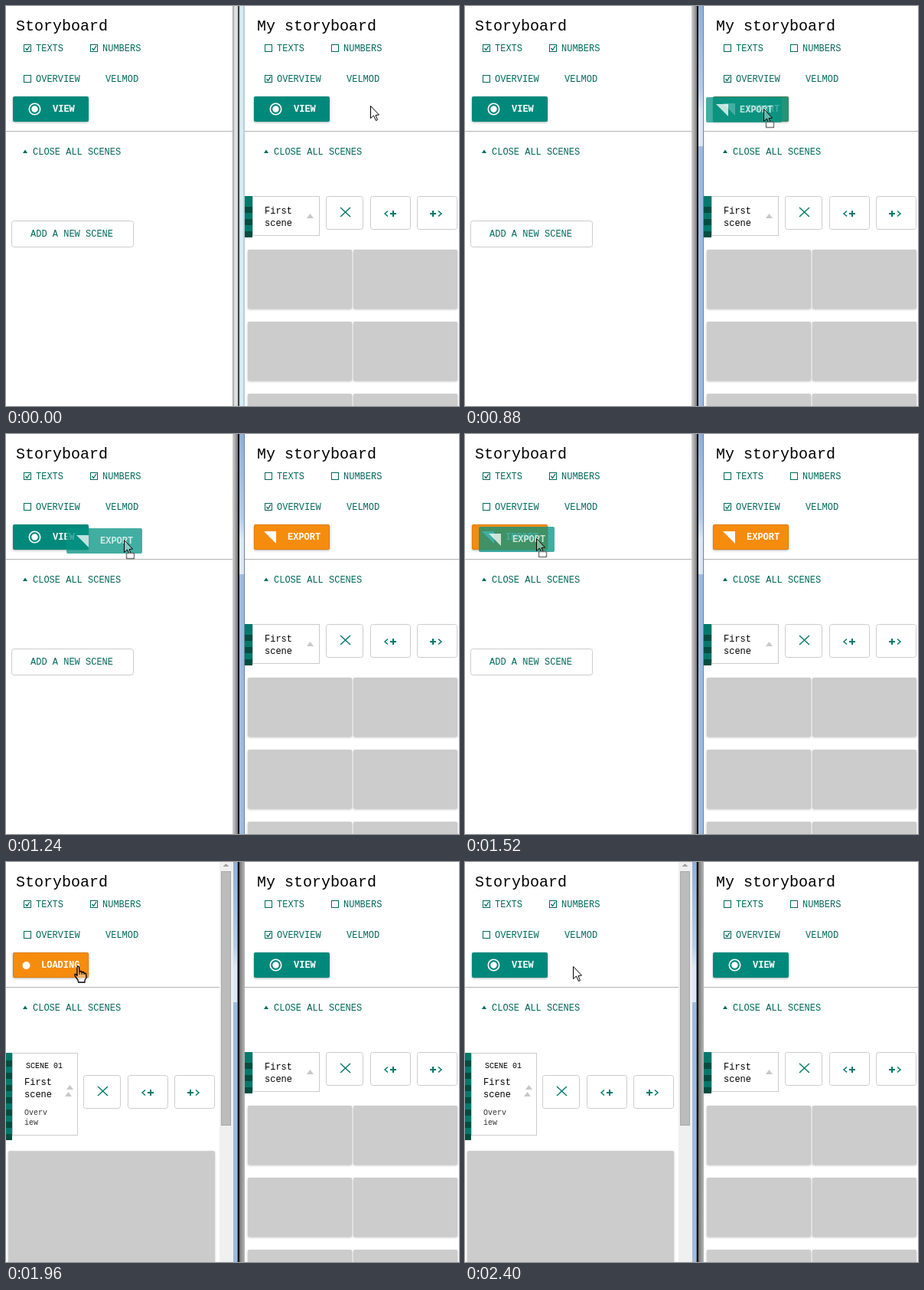
Write an HTML page with a canvas that moves like this. It is 592 px wide and 522 px high and loops after 3.04 s.

```html
<!DOCTYPE html>
<html>
<head>
<meta charset="utf-8">
<title>Storyboard</title>
<style>
html, body { margin: 0; width: 100%; height: 100%; overflow: hidden; background: #fff; }
canvas { display: block; }
</style>
</head>
<body>
<canvas id="stage" width="592" height="522"></canvas>
<script>
const g = document.getElementById('stage').getContext('2d');
const LOOP = 3040, STEP = 40;
const TEAL = [0, 137, 123], HOVER = [12, 148, 132], ORANGE = [246, 140, 13];
const LINK = '#00695c', ICON = '#00796b', GREY = '#ccc';

const ease = {
  lin: u => u,
  in: u => u * u,
  out: u => u * (2 - u),
  both: u => u * u * (3 - 2 * u)
};
const clamp = u => Math.max(0, Math.min(1, u));

// time, x, y, easing towards this point
const pointer = [
  [0, 476, 130, 'lin'], [240, 476, 130, 'lin'], [600, 399, 133, 'both'],
  [800, 399, 133, 'lin'], [1000, 343, 138, 'in'], [1240, 154, 138, 'lin'],
  [1360, 107, 137, 'out'], [1520, 93, 136, 'out'], [1960, 93, 136, 'lin'],
  [2360, 141, 136, 'both'], [LOOP, 141, 136, 'lin']
];
// time, colour, length of the blend
const leftTint = [[0, TEAL, 1], [1380, ORANGE, 120], [2120, TEAL, 280]];
const rightTint = [[0, TEAL, 1], [460, HOVER, 140], [840, ORANGE, 200], [1840, TEAL, 80]];

function pointerAt(t) {
  const i = Math.max(1, pointer.findIndex(k => k[0] >= t));
  const [t0, x0, y0] = pointer[i - 1], [t1, x1, y1, e] = pointer[i];
  const u = ease[e]((t - t0) / (t1 - t0));
  return [Math.round(x0 + (x1 - x0) * u), Math.round(y0 + (y1 - y0) * u)];
}

function tintAt(keys, t) {
  let c = keys[0][1];
  for (const [start, to, len] of keys) {
    const u = ease.both(clamp((t - start) / len));
    c = c.map((v, i) => v + (to[i] - v) * u);
  }
  return `rgb(${c.map(Math.round)})`;
}

function box(x, y, w, h, fill) {
  g.fillStyle = fill;
  g.fillRect(x, y, w, h);
}

function text(s, x, y, color = LINK, size = 12, weight = '') {
  g.font = `${weight} ${size}px "Liberation Mono", monospace`;
  g.fillStyle = color;
  g.fillText(s, x, y);
}

function path(points, fill, stroke, width = 1, closed = true) {
  g.beginPath();
  for (let i = 0; i < points.length; i += 2) g.lineTo(points[i], points[i + 1]);
  if (closed) g.closePath();
  if (fill) { g.fillStyle = fill; g.fill(); }
  if (stroke) { g.strokeStyle = stroke; g.lineWidth = width; g.stroke(); }
}

function rounded(x, y, w, h, r, fill, stroke) {
  g.beginPath();
  g.roundRect(x, y, w, h, r);
  if (fill) { g.fillStyle = fill; g.fill(); }
  if (stroke) { g.strokeStyle = stroke; g.lineWidth = 1; g.stroke(); }
}

function raised(x, y, w, h, fill, shade = .3) {
  g.save();
  g.shadowColor = `rgba(0,0,0,${shade})`;
  g.shadowBlur = 3;
  g.shadowOffsetY = 1;
  rounded(x, y, w, h, 2, fill);
  g.restore();
}

function at(x, y, draw) {
  g.save();
  g.translate(x, y);
  draw();
  g.restore();
}

function disc(x, y, r) {
  g.beginPath();
  g.arc(x, y, r, 0, 7);
  g.fillStyle = '#fff';
  g.fill();
}

function option(label, x, y, checked) {
  g.strokeStyle = LINK;
  g.lineWidth = 1;
  g.strokeRect(x + .5, y + .5, 9, 9);
  if (checked) path([x + 2.5, y + 5, x + 4.5, y + 7.5, x + 8, y + 2], null, LINK, 1.3, false);
  text(label, x + 16, y + 9);
}

function buttonFace(label) {
  if (label === 'VIEW') {
    g.beginPath();
    g.arc(28.5, 16.5, 7.2, 0, 7);
    g.strokeStyle = '#fff';
    g.lineWidth = 1.6;
    g.stroke();
    disc(28.5, 16.5, 4.2);
    text(label, 52, 20, '#fff', 12, 'bold');
  } else if (label === 'LOADING') {
    disc(17.5, 17, 5);
    text(label, 37, 20, '#fff', 12, 'bold');
  } else {
    path([13, 9, 29, 9, 29, 25], '#fff');
    text(label, 44, 20, '#fff', 12, 'bold');
  }
}

function mainButton(label, tint) {
  at(9, 118, () => {
    raised(0, 0, 99, 33, tint);
    if (label !== 'VIEW') rounded(.5, .5, 98, 32, 2, null, 'rgba(160,80,0,.25)');
    buttonFace(label);
  });
}

function header(title, checks, label, tint) {
  text(title, 13, 32, '#000', 20);
  option('TEXTS', 23, 50, checks);
  option('NUMBERS', 110, 50, checks);
  option('OVERVIEW', 23, 90, !checks);
  text('VELMOD', 130, 99);
  path([22, 192, 25, 187.5, 28, 192], LINK);
  text('CLOSE ALL SCENES', 35, 194);
  mainButton(label, tint);
}

function strip(x, y, w, h, first) {
  box(x, y, w, h, ICON);
  for (let d = first; d < h; d += 16) box(x, y + d, w, 8, '#004d40');
}

function card(x, y, w, h) {
  box(x, y, w, h, '#fff');
  g.strokeStyle = GREY;
  g.lineWidth = 1;
  g.strokeRect(x + .5, y + .5, w - 1, h - 1);
}

function sceneName(x, y) {
  text('First', x, y, '#000');
  text('scene', x, y + 16, '#000');
  path([x + 55, y + 6, x + 59.5, y, x + 64, y + 6], '#c8c8c8');
}

function plus(x) {
  box(x - 4, 22, 8, 2, ICON);
  box(x - 1, 19, 2, 8, ICON);
}

function sceneButtons(x, y) {
  at(x, y, () => {
    [[0, 48], [58, 52], [119, 52]].forEach(([bx, w]) =>
      rounded(bx + .5, .5, w, 43, 3, '#fff', GREY));
    path([19, 15, 32, 27], null, ICON, 1.4, false);
    path([32, 15, 19, 27], null, ICON, 1.4, false);
    path([81, 19.5, 77, 23, 81, 26.5], null, ICON, 1.5, false);
    plus(88);
    plus(140);
    path([147, 19.5, 151, 23, 147, 26.5], null, ICON, 1.5, false);
  });
}

function rightPane(t) {
  const label = t >= 840 && t < 1840 ? 'EXPORT' : 'VIEW';
  box(312, 163, 280, 1, '#b4b4b4');
  at(315, 0, () => header('My storyboard', false, label, tintAt(rightTint, t)));
  strip(312, 248, 10, 52, 14);
  card(322, 248, 88, 52);
  sceneName(338, 271);
  sceneButtons(418, 248);
  for (let y = 318; y < 522; y += 94) {
    raised(316, y, 136, 77, GREY, .25);
    raised(454, y, 136, 77, GREY, .25);
  }
}

function leftPane(t, loaded) {
  const label = t < 1400 || t >= 2120 ? 'VIEW' : t < 1840 ? 'IMPORT' : 'LOADING';
  box(0, 163, loaded ? 279 : 296, 1, '#b4b4b4');
  header('Storyboard', true, label, tintAt(leftTint, t));
  if (!loaded) {
    rounded(7.5, 280.5, 159, 34, 3, '#fff', GREY);
    text('ADD A NEW SCENE', 32, 301);
    return;
  }
  strip(0, 249, 8, 108, 10);
  card(8, 249, 86, 108);
  text('SCENE 01', 26, 269, '#000', 10);
  sceneName(24, 291);
  at(-2, 9, () => path([79, 297, 83.5, 291, 88, 297], '#c8c8c8'));
  text('Overv', 24, 330, '#333', 10);
  text('iew', 24, 343, '#333', 10);
  sceneButtons(101, 278);
  g.globalAlpha = ease.both(clamp((t - 1880) / 100));
  raised(3, 377, 270, 160, GREY, .25);
  g.globalAlpha = 1;
  box(279, 0, 18, 522, '#f0f0f0');
  box(281, 12, 13, 332, '#a8a8a8');
  box(282, 13, 11, 330, '#bcbcbc');
  path([283.5, 6, 287.5, 2, 291.5, 6], '#a3a3a3');
}

function shade(x, w, ...colors) {
  const fill = g.createLinearGradient(x, 0, x + w, 0);
  colors.forEach((c, i) => fill.addColorStop(i / (colors.length - 1), c));
  box(x, 0, w, 522, fill);
}

function glass(x, w) {
  const fill = g.createLinearGradient(0, 0, 0, 183);
  fill.addColorStop(0, '#8fb0d8');
  fill.addColorStop(.6, '#b4cde9');
  fill.addColorStop(.75, '#dce8f5');
  fill.addColorStop(1, '#dce8f5');
  box(x, 0, w, 183, fill);
  box(x, 183, w, 339, '#9cbbe0');
}

function divider(t, loaded) {
  if (t < 840) {
    shade(296, 7, '#a0a0a0', '#e4e4e4', '#d4d4d4');
    box(303, 0, 2, 522, '#3c4448');
    shade(305, 7, '#c4dde6', '#dff1f8', '#a9c3cc');
  } else if (!loaded) {
    shade(296, 7, '#d0d0d0', '#a8a8a8', '#777');
    box(303, 0, 2, 522, '#111');
    glass(305, 6);
    box(311, 0, 1, 522, '#6d8199');
  } else {
    glass(297, 5);
    box(302, 0, 1, 522, '#6d8199');
    box(303, 0, 2, 522, '#111');
    shade(305, 7, '#707070', '#999', '#b4b4b4');
  }
}

function arrow() {
  path([.5, .5, .5, 16.5, 4.5, 13, 7.5, 19.5, 9.5, 18.5, 7, 12.5, 11.5, 12],
    'rgba(255,255,255,.35)', '#000');
}

function hand() {
  g.lineJoin = 'round';
  path([1, 0, 2.5, 1, 3, 7, 5.5, 6.5, 6, 8, 8.5, 7.5, 9, 9, 11.5, 9.5, 12, 15,
    10, 18, 10, 21, 1.5, 21, 1, 18, -3, 12.5, -3, 10.5, -1.5, 10.5, 0, 12.5, 0, 1],
    'rgba(255,255,255,.35)', '#000', 1.3);
  path([3, 7, 3, 11], null, '#000', 1, false);
  path([6, 8, 6, 11], null, '#000', 1, false);
  path([9, 9, 9, 11], null, '#000', 1, false);
}

function ghost(x, y) {
  g.globalAlpha = .75;
  at(x, y, () => {
    rounded(0, 0, 99, 33, 2, 'rgb(3,147,131)');
    buttonFace('EXPORT');
  });
  g.globalAlpha = 1;
}

function draw(t) {
  const [x, y] = pointerAt(t);
  const loaded = t >= 1880, dragging = t >= 840 && t < 1840;
  box(0, 0, 592, 522, '#fff');
  leftPane(t, loaded);
  rightPane(t);
  divider(t, loaded);
  if (dragging) ghost(x - 75, y - 15);
  const overButton = t < 840 ? x < 423 : x < 108;
  at(x, y, !dragging && overButton ? hand : arrow);
  if (dragging) {
    box(x + 3, y + 17, 11, 8, '#fff');
    g.setLineDash([1, 1]);
    g.strokeStyle = '#000';
    g.lineWidth = 1.5;
    g.strokeRect(x + 3.5, y + 17.5, 10, 7);
    g.setLineDash([]);
  }
}

const begin = performance.now();
function tick() {
  const t = (performance.now() - begin) % LOOP;
  draw(Math.floor(t / STEP) * STEP);
  requestAnimationFrame(tick);
}
tick();
</script>
</body>
</html>
```
